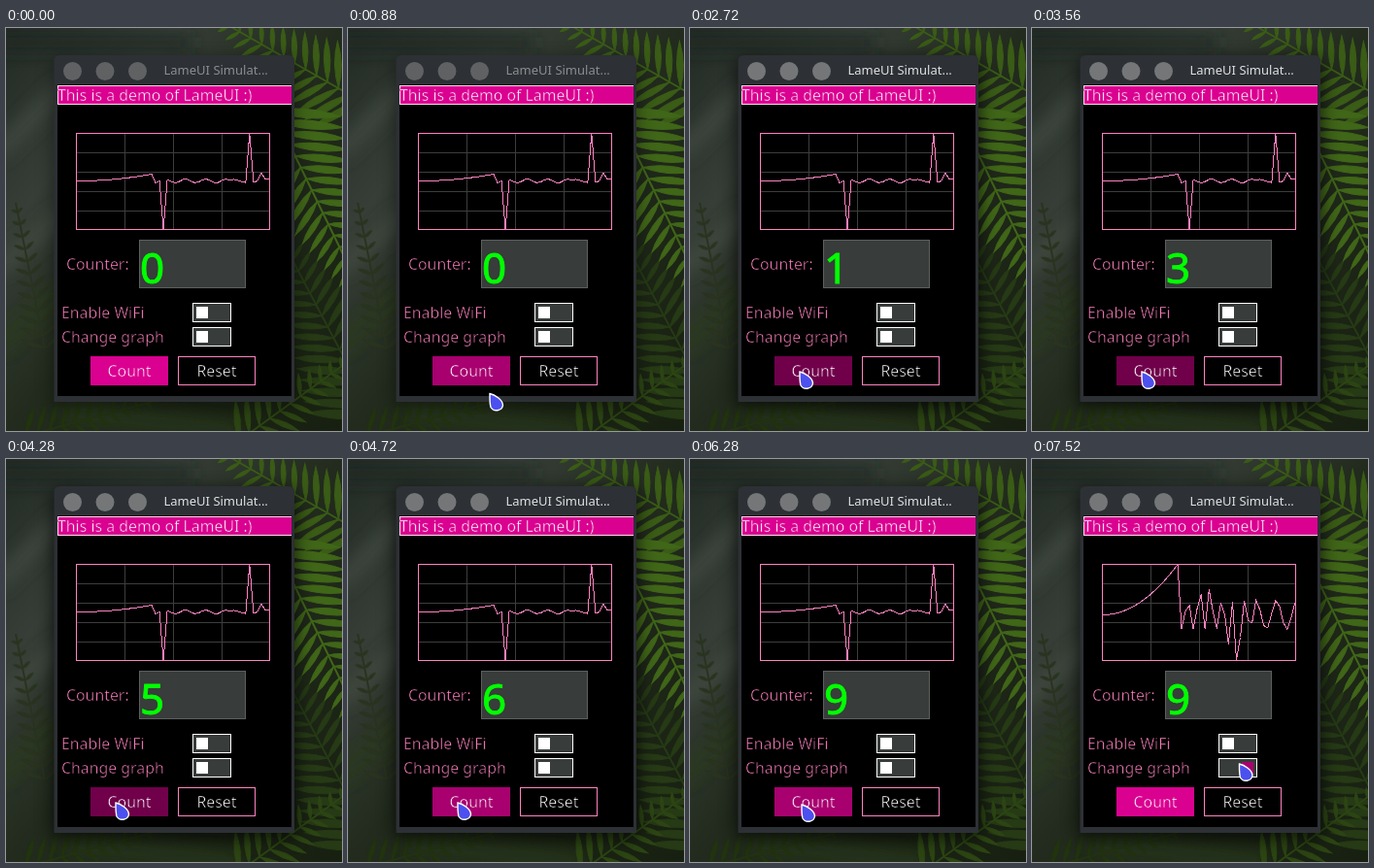
An HTML page for the animation above (8000 ms loop, 346 by 415 pixels).

```html
<!DOCTYPE html>
<html lang="en">
<head>
<meta charset="utf-8">
<title>LameUI Simulator</title>
<style>
  html, body { margin: 0; width: 100%; height: 100%; overflow: hidden; background: #20241f; }
  svg { display: block; width: 346px; height: 415px; }
  text { font: 15.85px "Noto Sans", "Open Sans", sans-serif; white-space: pre; }
  /* A thin outline in the colour behind the text makes its strokes finer. */
  .fine { stroke: #000; stroke-width: .5; }
  .pink { fill: #ff82c0; }
  .white { fill: #fff; }
  .crisp { shape-rendering: crispEdges; }
  #title { font-size: 13px; }
  #digit { font-size: 44px; fill: #0f0; stroke: #0f0; stroke-width: .9; }
</style>
</head>
<body>
<svg viewBox="0 0 346 415">
  <defs>
    <linearGradient id="forest" x1="0" y1="0" x2="1" y2="1">
      <stop offset="0" stop-color="#222a24"/>
      <stop offset=".25" stop-color="#363e37"/>
      <stop offset=".5" stop-color="#222b1d"/>
      <stop offset="1" stop-color="#172010"/>
    </linearGradient>
    <filter id="blur" x="-50%" y="-50%" width="200%" height="200%"><feGaussianBlur stdDeviation="9"/></filter>
    <filter id="soft"><feGaussianBlur stdDeviation=".7"/></filter>
  </defs>

  <rect width="346" height="415" fill="url(#forest)"/>
  <g filter="url(#blur)" fill="none" stroke-width="14">
    <path d="M-10 130L60 60M-10 250L60 190" stroke="#434b43"/>
    <path d="M-10 330L60 270M60 395L240 415" stroke="#2a3a1c"/>
    <path d="M-10 15H190" stroke="#1f2620"/>
  </g>
  <g id="ferns" filter="url(#soft)"></g>

  <rect id="shadow" x="48" y="32" width="250" height="358" rx="6" filter="url(#blur)"/>
  <path d="M49.500 385V34Q49.500 28 56 28H291Q297 28 297 34V385Z" fill="#2d3034"/>
  <g id="dots">
    <circle cx="68.500" cy="44.500" r="9.500"/>
    <circle cx="102" cy="44.500" r="9.500"/>
    <circle cx="135.500" cy="44.500" r="9.500"/>
  </g>
  <text id="title" x="162.500" y="48">LameUI Simulat...</text>

  <g class="crisp">
    <rect x="53" y="58" width="241" height="321"/>
    <rect x="53" y="59" width="241" height="20" fill="#da0090"/>
    <path d="M294 59.500H53.500V78.500H294" fill="none" stroke="#ffe0f0"/>
    <path d="M122.500 108V207M172.500 108V207M222.500 108V207M73 128.500H271M73 148.500H271M73 168.500H271M73 188.500H271" stroke="#3c3e3c"/>
    <rect x="72.500" y="108.500" width="199" height="99" fill="none" stroke="#ff82c0"/>
    <rect x="137.500" y="218.500" width="109" height="49" fill="#383c3a" stroke="#5b605d"/>
    <rect x="192.500" y="283.500" width="39" height="19" fill="#383c3a" stroke="#fff"/>
    <rect x="192.500" y="308.500" width="39" height="19" fill="#383c3a" stroke="#fff"/>
    <rect x="196" y="287" width="12" height="12" fill="#fff"/>
    <rect id="knob" y="312" width="12" height="12"/>
    <rect id="count" x="87" y="338" width="80" height="30"/>
    <rect id="reset" x="177.500" y="338.500" width="79" height="29" stroke="#ff82c0"/>
    <polyline id="graph" fill="none" stroke="#ff82c0"/>
  </g>

  <text class="fine white" x="53" y="75" style="stroke:#da0090">This is a demo of LameUI :)</text>
  <text class="fine pink" x="62" y="249">Counter:</text>
  <text id="digit" x="138" y="262.500"></text>
  <text class="fine pink" x="57" y="299">Enable WiFi</text>
  <text class="fine pink" x="57" y="324">Change graph</text>
  <text id="countLabel" class="fine white" x="127" y="359" text-anchor="middle">Count</text>
  <text id="resetLabel" class="fine white" x="217" y="359" text-anchor="middle">Reset</text>

  <path id="pointer" d="M1 .500C6 1.500 14.500 7 14.500 12.500A6.700 6.300 0 0 1 2 14.500C.800 10 1 5 1 .500Z" fill="#4b50ef" stroke="#fff" stroke-width="1.400"/>
</svg>

<script>
const LOOP = 8000, STEP = 40, FOCUS = 2720, TOGGLE = 7400, HOLD = 120;
const $ = id => document.getElementById(id);

// A frond is a stem with slender, tapering leaflets on both sides.
function frond(x0, y0, x1, y1, size, color) {
  const length = Math.hypot(x1 - x0, y1 - y0);
  const angle = Math.atan2(y1 - y0, x1 - x0) * 180 / Math.PI;
  let leaflets = "";
  for (let s = 0; s < length; s += 13) {
    const r = size * (1 - 0.8 * s / length), w = 1.5 + r * 0.11;
    for (const side of [-1, 1])
      leaflets += `M${s} 0Q${s + r * 0.3 + w} ${side * (r * 0.5 - w / 2)} ${s + r * 0.6} ${side * r}` +
        `Q${s + r * 0.3 - w} ${side * (r * 0.5 + w / 2)} ${s} 0Z`;
  }
  $("ferns").insertAdjacentHTML("beforeend",
    `<g transform="translate(${x0} ${y0}) rotate(${angle})" fill="${color}" stroke="${color}">
      <path d="${leaflets}"/><path d="M0 0H${length}" stroke-width="2"/></g>`);
}
frond(380, 400, 285, 220, 60, "#263a15");
frond(20, 420, 150, 385, 26, "#22330f");
frond(40, 330, 10, 180, 22, "#29331f");
frond(365, 75, 225, -5, 48, "#3a5c16");
frond(275, 85, 365, 270, 60, "#406618");
frond(240, 425, 350, 345, 36, "#2c4513");

// A parabola leads into a ripple that is interrupted by triangular spikes.
function curve({ base, rise, ripple, period, crest, spikes }) {
  const points = [];
  for (let u = 0; u <= 1; u += 1 / 16) points.push([73 + 77 * u, base - rise * u * u]);
  for (let i = 1; i <= 30; i++) {
    const spike = spikes.find(([at]) => at === i);
    const wave = ripple * Math.cos(2 * Math.PI * (i - crest) / (i > 20 ? period * 1.8 : period));
    points.push([150 + i * 121 / 30, base + (spike ? spike[1] : wave)]);
  }
  return points.map(([x, y]) => `${x.toFixed(1)},${(y + 0.5).toFixed(1)}`).join(" ");
}
const calm = curve({ base: 157, rise: 7, ripple: 2, period: 5.2, crest: 6,
  spikes: [[3, 50], [25, -49], [28, -8]] });
const wild = curve({ base: 160, rise: 52, ripple: -15, period: 2.9, crest: 20,
  spikes: [[6, -21], [8, -26], [13, 30], [15, 47], [16, 23]] });

// Pointer moves: start, end, x, y
const entry = [166, 397];
const moves = [
  [600, 740, 154, 361], [740, 880, 145, 376], [1480, 1520, 141, 358], [1640, 1840, 233, 349.5],
  [1960, 2480, 112, 353.5], [6240, 6280, 114, 355.5], [6320, 6600, 147, 351], [7080, 7120, 212.5, 313.5]
];
const presses = [2720, 3040, 3560, 3920, 4280, 4600, 4880, 5120, 5440];

function pointerAt(t) {
  if (t < moves[0][0]) return [-50, -50];
  let [x, y] = entry;
  for (const [from, to, toX, toY] of moves) {
    const k = Math.min(1, Math.max(0, (t - from) / (to - from)));
    x += (toX - x) * k;
    y += (toY - y) * k;
  }
  return [x, y];
}

function shade(pressed, hovered) {
  return pressed ? "#70004a" : hovered ? "#a8006f" : "#da0090";
}

function paintButton(id, color) {
  $(id).setAttribute("fill", color);
  $(id + "Label").style.stroke = color;
}

function draw(now) {
  const t = Math.floor(now % LOOP / STEP) * STEP;
  const focused = t >= FOCUS, toggled = t >= TOGGLE;
  const overReset = t >= 1760 && t < 2240;
  const overCount = t >= 720 && t < 7120 && !overReset;
  const pressed = presses.some(down => t >= down && t < down + HOLD);

  $("title").setAttribute("fill", focused ? "#dfe1e3" : "#8b8e91");
  $("dots").setAttribute("fill", focused ? "#747678" : "#5f6163");
  $("shadow").setAttribute("opacity", focused ? 0.7 : 0.4);
  $("graph").setAttribute("points", toggled ? wild : calm);
  $("digit").textContent = presses.filter(down => t >= down).length;
  paintButton("count", shade(pressed, overCount));
  paintButton("reset", overReset ? "#4f4f4f" : "#000");
  $("knob").setAttribute("x", toggled ? 216 : 196);
  $("knob").setAttribute("fill", toggled ? shade(t < TOGGLE + HOLD, true) : "#fff");
  $("pointer").setAttribute("transform", `translate(${pointerAt(t)})`);
}

const start = performance.now();
function tick() {
  draw(performance.now() - start);
  requestAnimationFrame(tick);
}
tick();
</script>
</body>
</html>
```
